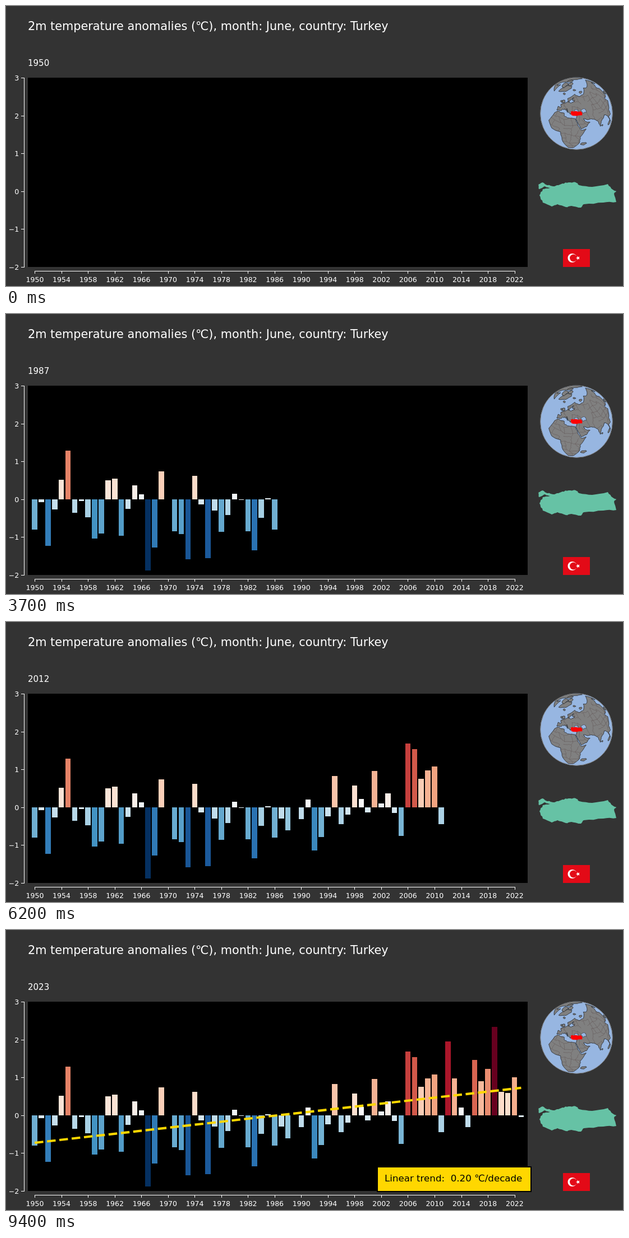
An HTML page that plays this animation: 1100 px wide and 500 px high, repeating every 9.5 s.

```html
<!DOCTYPE html>
<html lang="en">
<head>
<meta charset="utf-8">
<title>2m temperature anomalies</title>
<style>
  html, body { margin: 0; width: 100%; height: 100%; overflow: hidden; background: #333; }
  svg { display: block; width: 100%; height: 100%; }
  text { font-family: "DejaVu Sans", sans-serif; fill: #fff; white-space: pre; }
  .tick { font-size: 12.5px; }
  .axis { stroke: #fff; fill: none; shape-rendering: crispEdges; }
  .land { fill: #808080; stroke: #000; stroke-width: .6; }
  .sea { fill: #97b6e1; stroke: #000; stroke-width: .4; }
  .border { fill: none; stroke: #5f5252; stroke-width: .5; }
</style>
</head>
<body>
<svg viewBox="0 0 1100 500">
  <defs>
    <clipPath id="disc"><circle cx="1017" cy="192" r="64.5"/></clipPath>
    <clipPath id="ashore"></clipPath>
    <path id="country"/>
  </defs>

  <text x="39" y="43" font-size="20.8">2m temperature anomalies (℃), month: June, country: Turkey</text>
  <text id="year" x="39" y="107" font-size="15">1950</text>
  <rect x="39" y="128" width="891" height="338"/>
  <g id="axes"></g>
  <g id="bars" shape-rendering="crispEdges"></g>

  <g id="trend" visibility="hidden">
    <path id="line" fill="none" stroke="#ffd700" stroke-width="4.17" stroke-dasharray="15.42 6.67"/>
    <rect x="662" y="423" width="274" height="44" fill="#ffd700" stroke="#000" stroke-width="2"/>
    <text x="675" y="449" font-size="16.67" style="fill:#000">Linear trend:  0.20 ℃/decade</text>
  </g>

  <circle cx="1017" cy="192" r="64.5" fill="#97b6e1"/>
  <g id="globe" clip-path="url(#disc)"></g>
  <circle cx="1017" cy="192" r="64.3" fill="none" stroke="#777"/>
  <use href="#country" transform="translate(1017 192) scale(.125) translate(-1018 -337)" fill="#f00" stroke="#f00" stroke-width="24"/>
  <use href="#country" fill="#66c2a5"/>

  <rect x="993" y="434" width="48" height="32" fill="#e30a17"/>
  <circle cx="1009.5" cy="450" r="8" fill="#fff"/>
  <circle cx="1011.5" cy="450" r="6.4" fill="#e30a17"/>
  <path id="star" fill="#fff"/>
</svg>

<script>
const FIRST_YEAR = 1950, STEP = 100, LOOP = 9500;

// Measured anomaly of each year, in °C.
const anomalies = [
  -.80, -.07, -1.23, -.27, .51, 1.28, -.36, -.04, -.47, -1.04,
  -.90, .50, .54, -.96, -.25, .36, .13, -1.88, -1.27, .73,
  0, -.84, -.92, -1.58, .62, -.13, -1.55, -.30, -.86, -.41,
  .15, -.02, -.84, -1.35, -.49, .03, -.80, -.30, -.61, 0,
  -.31, .21, -1.14, -.78, -.24, .82, -.44, -.19, .57, .22,
  -.13, .96, .10, .36, -.15, -.75, 1.68, 1.53, .75, .97,
  1.08, -.44, 1.95, .97, .20, -.31, 1.46, .90, 1.22, 2.33,
  .62, .59, 1.00, -.04
];
const palette = "053061 2166ac 4393c3 92c5de d1e5f0 f7f7f7 fddbc7 f4a582 d6604d b2182b 67001f"
  .split(" ").map(hex => hex.match(/../g).map(h => parseInt(h, 16)));
const low = Math.min(...anomalies), high = Math.max(...anomalies);
const last = anomalies.length - 1;

const $ = id => document.getElementById(id);
const yearX = i => 51.2 + i * 11.88;
const valueY = v => 128 + (3 - v) * 67.6;
const parse = text => text.split(" ").map(p => p.split(",").map(Number));
const toPath = points => "M" + points.map(p => p.map(n => n.toFixed(2)).join(" ")).join("L");

let seed = 7;
function jitter(size) {
  seed = seed * 16807 % 2147483647;
  return (seed / 2147483647 * 2 - 1) * size;
}

function add(parent, tag, attrs, text = "") {
  const node = document.createElementNS("http://www.w3.org/2000/svg", tag);
  for (const key in attrs) node.setAttribute(key, attrs[key]);
  node.textContent = text;
  return parent.appendChild(node);
}

function colorOf(value) {
  const pos = (value - low) / (high - low) * (palette.length - 1);
  const k = Math.min(Math.floor(pos), palette.length - 2);
  return `rgb(${palette[k].map((c, j) => Math.round(c + (palette[k + 1][j] - c) * (pos - k)))})`;
}

function drawAxes() {
  let d = "M32.5 128V467M51 473.5H908";
  for (let v = -2; v <= 3; v++) {
    const y = valueY(v);
    d += `M27 ${Math.round(y) + .5}H32`;
    add($("axes"), "text", { class: "tick", x: 23.3, y: Math.round(y + 5), "text-anchor": "end" }, String(v).replace("-", "−"));
  }
  for (let i = 0; i <= 72; i += 4) {
    const x = yearX(i);
    d += `M${Math.round(x) + .5} 473V478`;
    add($("axes"), "text", { class: "tick", x: x + .3, y: 493, "text-anchor": "middle" }, FIRST_YEAR + i);
  }
  add($("axes"), "path", { class: "axis", d });
}

function drawBar(value, i) {
  const [left, right] = [-4.75, 4.75].map(dx => Math.round(yearX(i) + dx));
  const zero = Math.round(valueY(0)), end = Math.round(valueY(value));
  return add($("bars"), "rect", {
    x: left, width: right - left, y: Math.min(zero, end), height: Math.abs(zero - end), fill: colorOf(value)
  });
}

// Least-squares line through all years.
function drawTrend() {
  const sum = f => anomalies.reduce((total, v, i) => total + f(v, i), 0);
  const middle = last / 2, mean = sum(v => v) / anomalies.length;
  const slope = sum((v, i) => (i - middle) * v) / sum((v, i) => (i - middle) ** 2);
  const point = i => [yearX(i), valueY(mean + slope * (i - middle))];
  $("line").setAttribute("d", toPath([point(0), point(last)]));
}

// Splits each edge into short pieces and shakes the new points.
function roughen(points, size, closed = true, pieces = 4) {
  const out = [];
  points.forEach(([x, y], i) => {
    out.push([x, y]);
    if (!closed && i === points.length - 1) return;
    const [nx, ny] = points[(i + 1) % points.length];
    for (let k = 1; k < pieces; k++) {
      const t = k / pieces;
      out.push([x + (nx - x) * t + jitter(size), y + (ny - y) * t + jitter(size)]);
    }
  });
  return out;
}

// Orthographic view centred on 35°E 39°N; hidden points slide to the rim.
function project([lon, lat]) {
  const rad = Math.PI / 180, p = lat * rad, c = 39 * rad, l = (lon - 35) * rad;
  let x = Math.cos(p) * Math.sin(l);
  let y = Math.cos(c) * Math.sin(p) - Math.sin(c) * Math.cos(p) * Math.cos(l);
  const depth = Math.sin(c) * Math.sin(p) + Math.cos(c) * Math.cos(p) * Math.cos(l);
  if (depth < 0) {
    const r = Math.hypot(x, y);
    x /= r;
    y /= r;
  }
  return [1017 + 64.5 * x, 192 - 64.5 * y];
}
const onGlobe = points => toPath(points.map(project));

function blob([lon, lat, size]) {
  const stretch = 1.2 / Math.cos(lat * Math.PI / 180);
  return Array.from({ length: 9 }, (_, i) => {
    const a = i / 9 * 2 * Math.PI, r = size * (1 + jitter(.3));
    return [lon + r * stretch * Math.cos(a), lat + r * Math.sin(a)];
  });
}

// Main capes and bays as lon,lat; roughening fills in the coast between them.
const coasts = [
  "-6,36 10,37 11,33 20,31 32,31 37,21 43,11 51,12 41,-2 40,-15 35,-24 28,-33 19,-35 12,-17 9,4 -8,4 -17,14 -10,31",
  "34,30 43,13 52,16 59,22 51,25 48,30 57,27 67,25 73,20 77,8 80,15 91,22 98,16 104,1 101,13 109,12 107,21 122,30 118,39 128,36 140,50 136,55 160,60 158,52 180,65 160,70 113,74 100,78 68,69 44,67 33,69 26,71 5,61 12,56 18,61 24,65 22,60 30,60 20,55 9,56 -5,48 -1,44 -9,43 -8,37 0,39 9,44 17,39 13,45 23,37 24,41 27,37 36,36",
  "-165,62 -150,71 -95,69 -93,60 -80,53 -77,62 -56,52 -100,45 -150,60",
  "-45,60 -22,70 -18,80 -45,83 -65,77 -53,68"
];
// Centre and radius in degrees.
const islands = "-19,65,1.8 -2,54,2.6 -8,53,1.4 47,-19,3.5 18,79,1.6 60,74,2 138,37,3 81,8,1.3 -72,70,5 -110,72,4 -80,80,4 100,1,3";
const seas = "34.5,43.3,2.6 51,42,3.4";

function drawGlobe() {
  const draw = (cls, d, parent = $("globe")) => add(parent, "path", { class: cls, d });
  for (const coast of coasts) {
    const d = onGlobe(roughen(parse(coast), .8)) + "Z";
    draw("land", d);
    draw("", d, $("ashore"));
  }
  parse(islands).forEach(p => draw("land", onGlobe(blob(p)) + "Z"));
  drawBorders(draw);
  parse(seas).forEach(p => draw("sea", onGlobe(blob(p)) + "Z"));
}

// Borders: a shaken lattice with some edges missing, cut to the land.
function drawBorders(draw) {
  const group = add($("globe"), "g", { "clip-path": "url(#ashore)" });
  const nodes = Array.from({ length: 15 }, (_, i) => Array.from({ length: 12 }, (_, j) =>
    [11 * i - 18 + jitter(4), 9 * j - 34 + jitter(3)]));
  nodes.forEach((column, i) => column.forEach((node, j) => {
    for (const next of [nodes[i + 1]?.[j], column[j + 1]])
      if (next && jitter(1) < .4) draw("border", onGlobe(roughen([node, next], .9, false)), group);
  }));
}

function drawCountry() {
  const outline = "950,318 957,315 965,320 978,322 992,317 1003,315 1016,315 1022,320 1045,323 1073,318 1082,328 1088,331 1084,335 1088,350 1065,351 1030,354 1025,360 1008,357 998,359 983,354 973,358 957,351 951,338 957,327 970,325 961,322 950,327";
  $("country").setAttribute("d", toPath(roughen(parse(outline), .8)) + "Z");
}

function drawStar() {
  const tips = Array.from({ length: 10 }, (_, i) => {
    const a = Math.PI * (1 + i / 5), r = i % 2 ? 1.53 : 4;
    return [1019.8 + r * Math.cos(a), 450 + r * Math.sin(a)];
  });
  $("star").setAttribute("d", toPath(tips) + "Z");
}

drawAxes();
const bars = anomalies.map(drawBar);
drawTrend();
drawGlobe();
drawCountry();
drawStar();

function render() {
  const step = Math.floor(performance.now() % LOOP / STEP);
  $("year").textContent = FIRST_YEAR + Math.min(step, last);
  bars.forEach((bar, i) => bar.setAttribute("visibility", i < step ? "visible" : "hidden"));
  $("trend").setAttribute("visibility", step > last ? "visible" : "hidden");
  requestAnimationFrame(render);
}
render();
</script>
</body>
</html>
```
